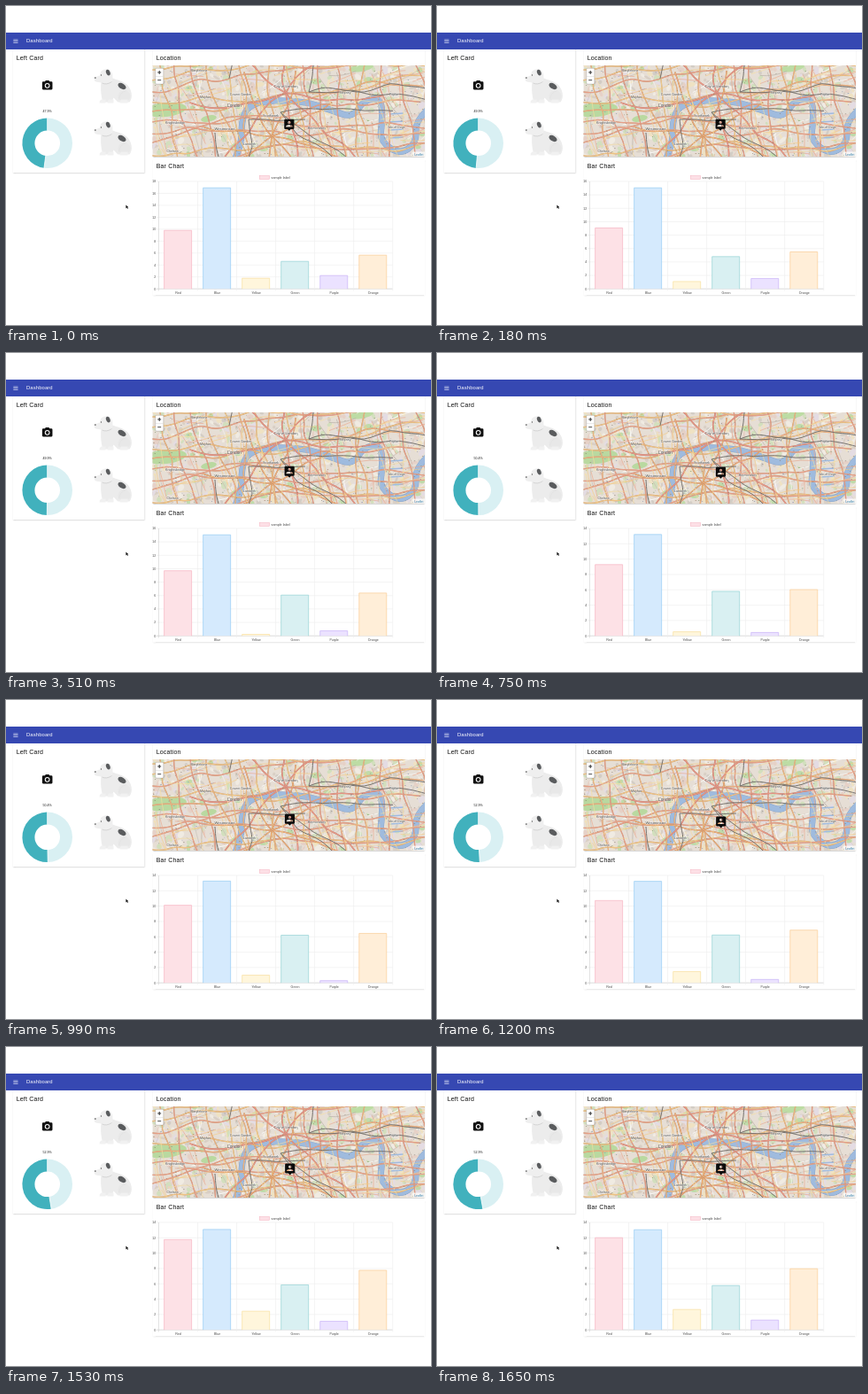
Recreate the animation shown at these times as an HTML page with a canvas. Size 480x360 px, loop 1680 ms.

```html
<!DOCTYPE html>
<html lang="en">
<head>
<meta charset="utf-8">
<title>Dashboard</title>
<style>
  html, body { margin: 0; width: 100%; height: 100%; overflow: hidden; background: #fff; }
  canvas { display: block; width: 480px; height: 360px; }
</style>
</head>
<body>
<canvas id="stage"></canvas>
<script>
const W = 480, H = 360, LOOP = 1680;
const SANS = '"Liberation Sans", Arial, sans-serif';
const dpr = window.devicePixelRatio || 1;

function setup(canvas) {
  canvas.width = W * dpr;
  canvas.height = H * dpr;
  const c = canvas.getContext('2d');
  c.scale(dpr, dpr);
  return c;
}
const ctx = setup(document.getElementById('stage'));
const backdrop = document.createElement('canvas');
const bg = setup(backdrop);

// Drawing helpers
function text(c, str, x, y, size, color, align = 'left', spacing = 0) {
  c.font = `${size}px ${SANS}`;
  c.textAlign = align;
  c.letterSpacing = spacing + 'px';
  c.fillStyle = color;
  c.fillText(str, x, y);
}
function rect(c, x, y, w, h, color) {
  c.fillStyle = color;
  c.fillRect(x, y, w, h);
}
function line(c, pts, color, width) {
  c.beginPath();
  for (const [x, y] of pts) c.lineTo(x, y);
  c.strokeStyle = color;
  c.lineWidth = width;
  c.stroke();
}
// Smooth stroke through the midpoints of the given points
function curve(c, pts, color, width) {
  c.beginPath();
  c.moveTo(...pts[0]);
  for (let i = 1; i < pts.length - 1; i++) {
    const [x, y] = pts[i], [u, v] = pts[i + 1];
    const last = i === pts.length - 2;
    c.quadraticCurveTo(x, y, last ? u : (x + u) / 2, last ? v : (y + v) / 2);
  }
  c.strokeStyle = color;
  c.lineWidth = width;
  c.stroke();
}
function ellipse(c, x, y, rx, ry, color, turn = 0) {
  c.beginPath();
  c.ellipse(x, y, rx, ry, turn, 0, 7);
  c.fillStyle = color;
  c.fill();
}
function icon(c, path, x, y, scale, color) {
  c.save();
  c.translate(x, y);
  c.scale(scale, scale);
  c.fillStyle = color;
  c.fill(new Path2D(path), 'evenodd');
  c.restore();
}

let seed = 41;
function rnd(a = 0, b = 1) {
  seed = (seed * 1664525 + 1013904223) % 4294967296;
  return a + (b - a) * seed / 4294967296;
}
const pick = list => list[Math.floor(rnd(0, list.length))];

const CAMERA = 'M9 2L7.2 4H4a2 2 0 0 0-2 2v12a2 2 0 0 0 2 2h16a2 2 0 0 0 2-2V6a2 2 0 0 0-2-2h-3.2L15 2zM12 17a5 5 0 1 1 0-10a5 5 0 0 1 0 10zM12 15.2a3.2 3.2 0 1 0 0-6.4a3.2 3.2 0 0 0 0 6.4z';
const PERSON = 'M19 2H5a2 2 0 0 0-2 2v14a2 2 0 0 0 2 2h4l3 3 3-3h4a2 2 0 0 0 2-2V4a2 2 0 0 0-2-2zM12 5.3a2.7 2.7 0 1 1 0 5.4a2.7 2.7 0 0 1 0-5.4zM18 16H6v-.9c0-2 4-3.1 6-3.1s6 1.1 6 3.1z';

function card(x, y, w, h) {
  bg.save();
  bg.shadowColor = 'rgba(0,0,0,.4)';
  bg.shadowBlur = 1.6 * dpr;
  bg.shadowOffsetY = .6 * dpr;
  rect(bg, x, y, w, h, '#fff');
  bg.restore();
}

function dog(x, y) {
  bg.save();
  bg.translate(x, y);
  // body, hind leg and paws
  icon(bg, 'M8 15C7 23 8 32 10 38H20L22 33L27 38H40C44 33 43 24 37 18C32 14 26 13 21 11Z', 0, 0, 1, '#ececec');
  ellipse(bg, 34, 31, 7, 6.5, '#e8e8e8');
  icon(bg, 'M8 35h5v4H6q0-3 2-4M17 35h5v4h-7q0-3 2-4M31 35h7v4h-9q0-3 2-4', 0, 0, 1, '#f1f1f1');
  curve(bg, [[28, 35], [29, 27], [36, 25]], '#dedede', .5);
  ellipse(bg, 31.5, 20, 5, 3, '#5a5c5e', .55);
  // head
  icon(bg, 'M8 3Q13-1 18 2Q23 7 20 15Q15 18 8 16L2 15Q-1 13 1 10L6 8Z', 0, 0, 1, '#efefef');
  ellipse(bg, 15.8, 4.6, 2.2, 3.4, '#5a5c5e', -.4);
  ellipse(bg, 1.3, 10.6, 1, .8, '#666');
  ellipse(bg, 8, 7.5, .6, .7, '#555');
  curve(bg, [[9, 16.5], [14, 19], [20, 15]], '#cfcfcf', .8);
  bg.restore();
}

// Wandering road from a point in a direction, cased and bent by the seed
function road(x, y, angle, length, color, casing, width) {
  const pts = [[x, y]];
  for (let d = 0; d < length; d += 16) {
    const a = angle + rnd(-.38, .38);
    x += 16 * Math.cos(a);
    y += 16 * Math.sin(a);
    pts.push([x, y]);
  }
  if (casing) curve(bg, pts, casing, width + .5);
  curve(bg, pts, color, width);
}

function drawMap() {
  const L = 165.5, T = 67, R = 473, B = 170;
  bg.save();
  bg.beginPath();
  bg.rect(L, T, R - L, B - T);
  bg.clip();
  rect(bg, L, T, R - L, B - T, '#e6ded5');

  // city blocks
  for (let i = 0; i < 700; i++) {
    const color = pick(['#d9cfc5', '#e4dce3', '#d3cdc5', '#d2dfbd', '#f0ebe2', '#e6d1c7', '#efe2c3']);
    ellipse(bg, rnd(L, R), rnd(T, B), rnd(1, 5), rnd(1, 3.2), color, rnd(0, 3));
  }
  // parks, the largest in the west
  ellipse(bg, 180, 117, 24, 8, '#b9d9a0', -.1);
  ellipse(bg, 229, 127, 9, 3.5, '#b9d9a0', -.2);
  ellipse(bg, 401, 70, 14, 4, '#bddca4', -.15);
  for (let i = 0; i < 24; i++) {
    ellipse(bg, rnd(L, R), rnd(T, B), rnd(2, 6), rnd(1.5, 4), '#c0dbaa', rnd(-.4, .4));
  }

  // side streets follow two slanted directions
  for (let i = 0; i < 1100; i++) {
    road(rnd(L, R), rnd(T, B), pick([-.3, 1.25]) + rnd(-.4, .4), rnd(4, 17),
      pick(['#fff', '#fff', '#f8f3ea', '#c9bfb5', '#b9b0a8']), '', rnd(.35, .75));
  }

  const river = [[258, 174], [266, 158], [266, 130], [273, 113], [296, 106], [340, 108],
    [368, 118], [392, 126], [404, 106], [424, 104], [425, 130], [422, 152], [445, 168], [464, 154], [462, 130], [476, 117]];
  curve(bg, river, '#8ba6ca', 7.2);
  curve(bg, river, '#9fbbde', 6.2);
  for (let y = 122; y < 150; y += 9) line(bg, [[433, y], [449, y - 1]], '#9fbbde', 1.6);

  // main roads: a slanted net, with trunk roads meeting in the centre
  for (let y = 72; y < 190; y += 12) {
    road(L - 6, y, -.06, 320, pick(['#f6cd86', '#f3b481', '#eea08c']), '#c89a78', .9);
  }
  for (let x = 172; x < R; x += 18) {
    road(x, T - 6, 1.4, 120, pick(['#f7d890', '#f4bd83', '#eb9a8b']), '#c89a78', .8);
  }
  for (let a = 0; a < 6.2; a += .78) {
    road(316, 98, a, 110, '#eb9786', '#b98276', 1.1);
    road(300, 147, a + .3, 80, '#f2b27a', '#c08c68', 1);
  }
  for (let i = 0; i < 130; i++) {
    road(rnd(L, R), rnd(T, B), pick([-.2, 1.3]), rnd(12, 40), pick(['#f5cc85', '#f4dda0', '#e9a98f']), '', .65);
  }

  // railways fan out from the stations
  const rail = (x, y, angle, length) => road(x, y, angle, length, '#77736f', '', 1);
  for (const a of [.15, .5, .75]) rail(310, 120, a, 120);
  for (const a of [-1.4, -.1, .05]) rail(342, 97, a, 130);
  for (const a of [1.7, .1]) rail(274, 128, a, 50);
  rail(236, 143, 1.6, 40);
  rail(252, 82, -1.4, 30);

  // small map symbols
  for (let i = 0; i < 420; i++) {
    rect(bg, rnd(L, R), rnd(T, B), rnd(.4, 1.6), .6, pick(['#8a8078', '#a07a66', '#7e9068', '#7e8aa8']));
  }

  const places = [['City of London', 316, 91.5, 4.2], ['London', 258, 114, 4.8], ['Westminster', 247, 140, 4.2],
    ['Marylebone', 218, 74, 3.6], ['Mayfair', 225, 104, 3.6], ['Covent Garden', 265, 101, 3.6],
    ['Knightsbridge', 191, 133, 3.6], ['Chelsea', 188, 165, 3.6], ['Lambeth', 275, 157, 3.6],
    ['Southwark', 299, 125, 3.8], ['Bermondsey', 351, 139, 3.6], ['Isle of Dogs', 441, 138, 3.6],
    ['Stepney', 383, 99, 3.5], ['Poplar', 438, 101, 3.5]];
  for (const [name, x, y, size] of places) {
    bg.strokeStyle = 'rgba(255,255,255,.65)';
    bg.lineWidth = .8;
    bg.font = `${size}px ${SANS}`;
    bg.textAlign = 'center';
    bg.strokeText(name, x, y);
    text(bg, name, x, y, size, '#444', 'center');
  }

  // zoom buttons and credit
  bg.beginPath();
  bg.roundRect(168.8, 70.3, 9, 17.8, 1);
  bg.fillStyle = '#fff';
  bg.fill();
  bg.strokeStyle = 'rgba(0,0,0,.25)';
  bg.lineWidth = .6;
  bg.stroke();
  rect(bg, 169, 79, 8.6, .4, '#ccc');
  rect(bg, 171.2, 74.5, 4, .9, '#222');
  rect(bg, 172.75, 72.95, .9, 4, '#222');
  rect(bg, 171.2, 83.3, 4, .8, '#222');
  rect(bg, 459.5, 164.5, 13.5, 5.5, 'rgba(255,255,255,.75)');
  text(bg, 'Leaflet', 466.3, 168.6, 3.4, '#2878a8', 'center');
  bg.restore();
}

function drawBackdrop() {
  rect(bg, 0, 0, W, H, '#fff');
  card(7.5, 44, 149, 144.3);
  card(165.5, 44, 307.5, 126);
  card(165.5, 173, 307.5, 153.8);
  rect(bg, 165, 171.2, 308.5, 2.6, '#fff');
  rect(bg, 0, 30, W, 19, '#3648b2');
  for (let i = 0; i < 3; i++) rect(bg, 8.3, 37.7 + i * 1.7, 5.2, .7, '#dfe3f6');
  text(bg, 'Dashboard', 23, 41.4, 5.9, '#fff', 'left', .1);
  const heading = (str, x, y) => text(bg, str, x, y, 7, '#111', 'left', .17);
  heading('Left Card', 11.7, 60.8);
  heading('Location', 169.7, 60.8);
  heading('Bar Chart', 169.7, 182.6);
  icon(bg, CAMERA, 39.7, 82.9, .58, '#111');
  dog(99.5, 70.5);
  dog(99.5, 129.5);
  drawMap();

  // pointer
  icon(bg, 'M0 0L0 4L1 3.2L1.7 4.6L2.4 4.2L1.8 2.9L3 2.8Z', 135.4, 224.4, 1, '#111');

  // legend
  rect(bg, 286.3, 191.5, 11.4, 4, '#fde0e6');
  bg.strokeStyle = '#f5b3c1';
  bg.lineWidth = .5;
  bg.strokeRect(286.3, 191.5, 11.4, 4);
  text(bg, 'sample label', 299.6, 194.9, 3.75, '#444');
}

// New data arrives every STEP ms; scale, caption and marker jump, shapes ease
const FIRST = 30, STEP = 540;
const STATES = [
  { max: 18, share: 47.9, pinY: 126.5 },
  { max: 16, share: 49.9, pinY: 126.4 },
  { max: 14, share: 50.4, pinY: 127.4 },
  { max: 14, share: 52.9, pinY: 130.2 }
];
// Name, fill, edge and bar height for each state
const BARS = [
  ['Red', '#fde1e6', '#f6b4c2', [66, 74, 90, 104]],
  ['Blue', '#d5eafd', '#94cbf3', [114, 114, 115, 113]],
  ['Yellow', '#fff6dc', '#f8e0a0', [12, 1, 10, 23]],
  ['Green', '#d9f0f2', '#93d2d5', [31, 47, 55, 50]],
  ['Purple', '#ebe2ff', '#c7b2f7', [15, 5, 2, 11]],
  ['Orange', '#ffeed8', '#f9cc96', [38, 49, 57, 69]]
];

function drawBars(tween, max) {
  const left = 172.5, right = 436.7, top = 198, base = 319.2, width = 31;
  const step = (right - left) / BARS.length;
  for (let v = 0; v <= max; v += 2) {
    const y = base - (base - top) * v / max;
    line(ctx, [[left - 2.5, y], [right, y]], v ? '#ececec' : '#c4c4c4', .6);
    text(ctx, v, left - 3.2, y + 1.3, 3.6, '#444', 'right');
  }
  for (let i = 0; i <= BARS.length; i++) {
    const x = left + i * step;
    line(ctx, [[x, top], [x, base + 2.3]], i ? '#ececec' : '#cfcfcf', .6);
  }
  BARS.forEach(([name, fill, edge, heights], i) => {
    const mid = left + (i + .5) * step, x = mid - 15.9, y = base - tween(heights);
    rect(ctx, x, y, width, base - y, fill);
    line(ctx, [[x, base], [x, y], [x + width, y], [x + width, base]], edge, .7);
    text(ctx, name, mid, 324.9, 3.6, '#444', 'center');
  });
}

function ring(from, to, color) {
  ctx.beginPath();
  ctx.arc(46.7, 154.8, 28.3, from, to);
  ctx.arc(46.7, 154.8, 14.3, to, from, true);
  ctx.closePath();
  ctx.fillStyle = color;
  ctx.fill();
}
function ringGap(angle) {
  const point = r => [46.7 + r * Math.cos(angle), 154.8 + r * Math.sin(angle)];
  line(ctx, [point(14), point(29)], '#fff', .8);
}

function draw() {
  const t = performance.now() % LOOP;
  const phase = (t - FIRST) / STEP;
  const from = Math.max(0, Math.min(2, Math.floor(phase)));
  const k = Math.max(0, Math.min(1, phase - from));
  const ease = 1 - (1 - k) ** 1.25;
  const tween = list => list[from] + (list[from + 1] - list[from]) * ease;
  const now = phase < 0 ? 0 : from + 1;
  const state = STATES[now];
  ctx.drawImage(backdrop, 0, 0, W, H);

  const start = -Math.PI / 2, full = 2 * Math.PI;
  const split = start + full * (1 - tween(STATES.map(s => s.share)) / 100);
  ring(start, split, '#d9f0f3');
  ring(split, start + full, '#41b1bd');
  ringGap(start);
  ringGap(split);
  text(ctx, state.share + '%', 46.7, 119.6, 3.6, '#111', 'center');

  icon(ctx, PERSON, 312.4 + .3 * now, state.pinY, .62, '#0b0b0b');
  drawBars(tween, state.max);
  requestAnimationFrame(draw);
}

drawBackdrop();
draw();
</script>
</body>
</html>
```
